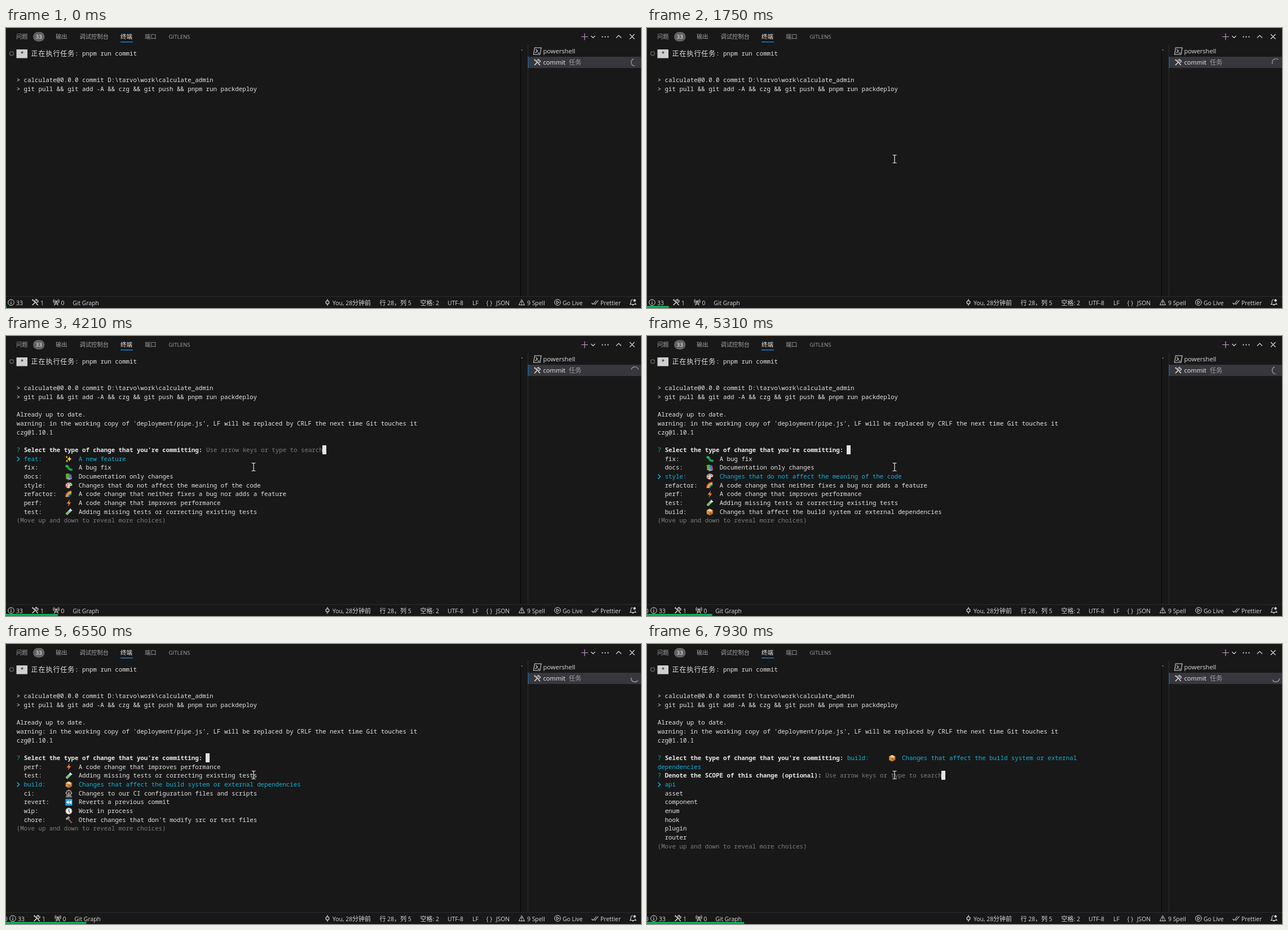
An HTML page with a canvas that plays this animation: 1126 by 497 pixels, repeating every 8000 ms.

```html
<!DOCTYPE html>
<html lang="zh-CN">
<head>
<meta charset="utf-8">
<title>Terminal commit</title>
<style>
  html, body { margin: 0; width: 100%; height: 100%; overflow: hidden; background: #181818; }
  canvas { display: block; width: 1126px; height: 497px; }
</style>
</head>
<body>
<canvas id="stage" width="1126" height="497"></canvas>
<script>
const ctx = document.getElementById('stage').getContext('2d');
const LOOP = 8000;
const MONO = '"Noto Sans Mono", "DejaVu Sans Mono", monospace';
const SANS = '"Open Sans", "Noto Sans", sans-serif';
const CJK = '"Noto Sans CJK SC", "Noto Sans CJK", sans-serif';
const CELL = 6.468, ROW = 15.68, LEFT = 18.7;
const FG = '#e4e4e4', UI = '#d8d8d8', DIM = '#7c7c7c', CYAN = '#14b2da', GREEN = '#0dbc79';

// When each thing happens, in ms
const AT = { mouse: 450, pulled: 2100, warned: 2650, czg: 3000, list: 3150, shift: 4620, scope: 6950 };
const KEYS = [4760, 5040, 5290, 5620, 5910, 6200, 6470];

const TYPES = [
  ['feat', 'A new feature'],
  ['fix', 'A bug fix'],
  ['docs', 'Documentation only changes'],
  ['style', 'Changes that do not affect the meaning of the code'],
  ['refactor', 'A code change that neither fixes a bug nor adds a feature'],
  ['perf', 'A code change that improves performance'],
  ['test', 'Adding missing tests or correcting existing tests'],
  ['build', 'Changes that affect the build system or external dependencies'],
  ['ci', 'Changes to our CI configuration files and scripts'],
  ['revert', 'Reverts a previous commit'],
  ['wip', 'Work in process'],
  ['chore', "Other changes that don't modify src or test files"]
];
const SCOPES = ['api', 'asset', 'component', 'enum', 'hook', 'plugin', 'router'];
const HINT = 'Use arrow keys or type to search';
const MORE = '(Move up and down to reveal more choices)';

function rect(x, y, w, h, color) {
  ctx.fillStyle = color;
  ctx.fillRect(x, y, w, h);
}

function disc(x, y, r, color) {
  ctx.fillStyle = color;
  ctx.beginPath();
  ctx.arc(x, y, r, 0, 7);
  ctx.fill();
}

function line(d, color, width = 1) {
  ctx.strokeStyle = color;
  ctx.lineWidth = width;
  ctx.stroke(new Path2D(d));
}

function shape(d, color) {
  ctx.fillStyle = color;
  ctx.fill(new Path2D(d));
}

function arc(x, y, r, from, to, color, width = 1) {
  ctx.strokeStyle = color;
  ctx.lineWidth = width;
  ctx.beginPath();
  ctx.arc(x, y, r, from, to);
  ctx.stroke();
}

function at(x, y, draw, scale = 1) {
  ctx.save();
  ctx.translate(x, y);
  ctx.scale(scale, scale);
  draw();
  ctx.restore();
}

// Interface text, with Chinese runs set in their own font
function label(str, x, y, color = UI, size = 10.4, cjk = size * 1.06, weight = 400) {
  ctx.fillStyle = color;
  for (const run of str.match(/[\u3000-\uffff]+|[^\u3000-\uffff]+/g)) {
    ctx.font = run.charCodeAt(0) > 0x2fff ? `${weight} ${cjk}px ${CJK}` : `${weight} ${size}px ${SANS}`;
    ctx.fillText(run, x, y);
    x += ctx.measureText(run).width;
  }
}

const colX = col => LEFT + col * CELL;
const midY = row => 45.7 + row * ROW;

function term(str, col, row, color = FG, weight = 500) {
  ctx.font = `${weight} 10.78px ${MONO}`;
  ctx.fillStyle = color;
  ctx.fillText(str, colX(col), Math.round(midY(row) + 3.5));
}

function block(col, row) {
  rect(Math.floor(colX(col) - .5), Math.floor(midY(row) - 8), 7, 16, FG);
}

function pointer(row) {
  at(19.6, midY(row), () => line('M0 -4 L4 0 L0 4', CYAN, 1.5));
}

// Small pictures for commit types, in a box of 14 units around 0,0
const PICS = {
  feat() {
    const star = 'M0 -5 Q.8 -.8 5 0 Q.8 .8 0 5 Q-.8 .8 -5 0 Q-.8 -.8 0 -5Z';
    at(1, 0, () => shape(star, '#ffc83d'));
    at(-4, -3.5, () => shape(star, '#ffb02e'), .5);
    at(-3.5, 4, () => shape(star, '#ffc83d'), .5);
  },
  fix() {
    line('M-4 -3 Q-2 -4 -1 0 Q1 4 5 3.5', '#16a34a', 4);
    disc(-4, -3, 2.5, '#22b455');
    disc(5, 3.5, 2, '#16a34a');
  },
  docs() {
    shape('M-1 -3 L5 -4 L6 4 L0 6Z', '#b4408f');
    shape('M-3 -4 L3 -5 L4 3 L-2 5Z', '#2f80d0');
    shape('M-6 -5 L0 -6 L1 3 L-5 4Z', '#5dac2e');
    line('M-5 4 L1 3 M-2 6 L5 4', '#e8e8e8', 1);
  },
  style() {
    shape('M-6 0 C-6 -7 6 -7 6.5 -1 C6 2 1 0 2 3 C3 7 -6 6 -6 0Z', '#e9c3ad');
    disc(-3, -2.5, 1.3, '#e04545');
    disc(1, -3.7, 1.3, '#3d8be0');
    disc(4, -1.5, 1.2, '#3aa655');
    disc(-3.5, 1.5, 1.3, '#8d55c7');
  },
  refactor() {
    ['#e5484d', '#f59f2f', '#f5d442', '#3fb66b', '#3d8be0'].forEach((c, i) =>
      arc(5, 5, 11 - i * 1.5, Math.PI, Math.PI * 1.5, c, 1.6));
  },
  perf() {
    shape('M2 -7 L-4 1 L0 1 L-2 7 L4 -1.5 L.5 -1.5Z', '#f9803a');
  },
  test() {
    line('M-4.5 4.5 L4 -4', '#b9d7df', 4.5);
    line('M-4.5 4.5 L1 -1', '#6cc644', 3.4);
    line('M2 -6 L6 -2', '#e8eef0', 1.5);
  },
  build() {
    shape('M0 -6 L6 -3 L0 0 L-6 -3Z', '#f3c27a');
    shape('M-6 -3 L0 0 L0 6.5 L-6 3.5Z', '#d98f38');
    shape('M6 -3 L0 0 L0 6.5 L6 3.5Z', '#b86f26');
    line('M-3 -4.5 L3 -1.5 L3 1', '#f7e2b8', 1.3);
  },
  ci() {
    line('M0 0 L-4 6.5 M0 0 L4 6.5 M-6 6.5 H6', '#a9a9a9', 1.2);
    arc(0, -.8, 4.6, 0, 7, '#b99a92', 1.2);
    for (let i = 0; i < 8; i++) {
      const a = i * Math.PI / 4, x = Math.cos(a), y = Math.sin(a);
      line(`M0 -.8 L${x * 4.6} ${y * 4.6 - .8}`, '#9a9a9a', .6);
      disc(x * 5.2, y * 5.2 - .8, 1.1, i % 2 ? '#c88a80' : '#c9c9c9');
    }
  },
  revert() {
    ctx.fillStyle = '#1b9be0';
    ctx.beginPath();
    ctx.roundRect(-6.5, -6.5, 13, 13, 1.5);
    ctx.fill();
    shape('M0 -3.8 L-5 0 L0 3.8Z M5 -3.8 L0 0 L5 3.8Z', '#ffffff');
  },
  wip() {
    disc(0, 0, 6.3, '#b0b0b0');
    disc(0, 0, 5.1, '#f2f2f2');
    line('M0 -4 V0 L2 3', '#333333', 1.1);
  },
  chore() {
    line('M-1 -2 L5.5 5.5', '#a0614a', 2.4);
    line('M-5 -1 L1 -5.5', '#9b9b9b', 4);
  }
};

function typeItem(index, col, row, color, desc = TYPES[index][1]) {
  const name = TYPES[index][0];
  term(name + ':', col, row, color);
  at(111.4 + (col - 2) * CELL, midY(row), PICS[name], .95);
  term(desc, col + 15, row, color);
}

function question(str, row) {
  term('?', 0, row, GREEN);
  term(str, 2, row, '#e8e8e8', 700);
}

function typeList(step) {
  question("Select the type of change that you're committing:", 10);
  if (!step) term(HINT, 52, 10, DIM);
  block(step ? 52 : 84, 10);
  const first = Math.max(0, step - 2);
  for (let i = 0; i < 7; i++) {
    const chosen = first + i === step;
    typeItem(first + i, 2, 11 + i, chosen ? CYAN : FG);
    if (chosen) pointer(11 + i);
  }
  term(MORE, 0, 18, DIM);
}

function scopeList() {
  question("Select the type of change that you're committing:", 10);
  const desc = TYPES[7][1], cut = desc.lastIndexOf(' ');
  typeItem(7, 52, 10, CYAN, desc.slice(0, cut));
  term(desc.slice(cut + 1), 0, 11, CYAN);
  question('Denote the SCOPE of this change (optional):', 12);
  term(HINT, 46, 12, DIM);
  block(78, 12);
  SCOPES.forEach((s, i) => term(s, 2, 13 + i, i ? FG : CYAN));
  pointer(13);
  term(MORE, 0, 20, DIM);
}

function terminal(t) {
  arc(10, 45.3, 3.4, 0, 7, '#6a6a6a', 1.3);
  rect(18.5, 38, 19.5, 15.5, '#d0d0d0');
  term('*', 1, 0, '#181818');
  ctx.font = `12px ${CJK}`;
  ctx.fillStyle = FG;
  [...'正在执行任务'].forEach((c, i) => ctx.fillText(c, colX(4 + 2 * i), 50));
  term(': pnpm run commit', 16, 0);
  term('> calculate@0.0.0 commit D:\\tarvo\\work\\calculate_admin', 0, 3);
  term('> git pull && git add -A && czg && git push && pnpm run packdeploy', 0, 4);
  if (t >= AT.pulled) term('Already up to date.', 0, 6);
  if (t >= AT.warned) term("warning: in the working copy of 'deployment/pipe.js', LF will be replaced by CRLF the next time Git touches it", 0, 7);
  if (t >= AT.czg) term('czg@1.10.1', 0, 8);
  if (t >= AT.scope) scopeList();
  else if (t >= AT.list) typeList(KEYS.filter(k => t >= k).length);
}

function tools(x, y) {
  at(x, y, () => {
    line('M-5 5 L1 -1 M-1 -1 L-4.5 -4.5 M1.5 1.5 L5 5', UI, 1.7);
    line('M5.3 -3.4 A3 3 0 1 1 3 -5.4 L2.3 -2.4 Z', UI, 1.1);
    line('M-5.5 -3.6 L-3.6 -5.5', UI, 1.2);
  });
}

function header() {
  const grey = '#a2a2a2';
  [['问题', 18], ['输出', 88], ['调试控制台', 130.5], ['端口', 246]].forEach(([s, x]) => label(s, x, 19, grey, 10, 10.3));
  label('终端', 203, 19, '#eeeeee', 10, 10.5, 500);
  label('GITLENS', 288.5, 19, grey, 9.7);
  rect(203, 24, 22, 1.5, '#0a84dd');
  ctx.fillStyle = '#616161';
  ctx.beginPath();
  ctx.roundRect(48, 7, 20.5, 17, 8.5);
  ctx.fill();
  label('33', 52.6, 19, '#ffffff', 9.8);
  line('M1020 15.5 H1032 M1026 9.5 V21.5', '#cf93cb', 1.2);
  line('M1037.5 14 L1041 17.5 L1044.5 14 M1082 17.5 L1086.5 13 L1091 17.5 M1106 11 L1114.5 19.5 M1114.5 11 L1106 19.5', UI, 1.2);
  [1057.5, 1062.5, 1067.5].forEach(x => disc(x, 15.7, 1.1, UI));
}

function sidebar(t) {
  rect(912, 37, 1, 439, '#050505');
  rect(913, 38, 3, 2, '#5a5a5a');
  rect(925, 30, 1, 446, '#2b2b2b');
  rect(926, 51, 200, 20, '#37373d');
  rect(925.5, 51, 1, 20, '#0a84dd');
  line('M937.5 35 H949 L947 47 H935.5 Z M939.5 38 L942.5 41 L938.5 44 M942.5 44.5 H946', UI, 1.1);
  label('powershell', 952.5, 45, '#dcdcdc', 11.15);
  tools(942, 61);
  label('commit', 952.5, 65, '#ececec', 11.15);
  label('任务', 998, 65.3, '#a0a0a0', 11.15, 11.2);
  // The spinner turns once in 1.5 s and restarts as git finishes
  const turn = t < 2700 ? 260 + t * .24 : (t - 2710) * .24;
  const mid = (Math.round(turn / 12) * 12 - 90) * Math.PI / 180;
  arc(1115, 61, 6.4, mid - 1.37, mid + 1.37, '#a8a8a8', 1.2);
}

function statusLeft(dx) {
  if (dx) label('0', -3.2, 491.5);
  at(dx, 0, () => {
    arc(9, 487.2, 5.3, 0, 7, UI);
    rect(8.4, 486.5, 1.2, 4, UI);
    rect(8.4, 484, 1.2, 1.3, UI);
    label('33', 18, 491.5);
    tools(51.7, 487);
    label('1', 61, 491.5);
    line('M85.5 492.5 L89 485 L92.5 492.5 M87 490 H91', UI, 1.1);
    disc(89, 485, 1.3, UI);
    for (const r of [3, 5.2]) {
      arc(89, 485, r, -.8, .8, UI);
      arc(89, 485, r, Math.PI - .8, Math.PI + .8, UI);
    }
    label('0', 97.5, 491.5);
    label('Git Graph', 118.3, 491.5);
  });
}

function statusBar(t) {
  rect(0, 476, 1126, 1, '#2b2b2b');
  statusLeft(t >= AT.shift ? 3 : 0);
  arc(570, 487, 2.9, 0, 7, UI, 1.2);
  line('M570 481 V484 M570 490 V493', UI, 1.2);
  [['You, 28分钟前', 579], ['行 28，列 5', 662.5], ['空格: 2', 734.5], ['UTF-8', 783], ['LF', 827],
   ['{ }', 851.5], ['JSON', 868.8], ['9 Spell', 924], ['Go Live', 987], ['Prettier', 1054]]
    .forEach(([s, x]) => label(s, x, 491.5));
  line('M914.5 482 L919.5 491.5 H909.5 Z M914.5 485 V488.5 M914.5 489.3 V490.5', UI);
  arc(978, 487, 5.3, 0, 7, UI);
  line('M976.3 484.2 L981 487 L976.3 489.8 Z', UI);
  line('M1038.5 488 L1041 490.5 L1047 483.5 M1043.5 489.5 L1044.5 490.5 L1050.5 483.5', UI, 1.1);
  line('M1111 482 Q1108 482.5 1108 486 V488.5 L1106.5 490.5 H1117 L1115.5 488.5 V487.5 M1110.5 491 Q1111.7 493.3 1113 491', UI, 1.1);
  disc(1114.5, 483.5, 2.2, UI);
  rect(0, 493.5, .9 + t * .0216, 3, '#10c45e');
}

function mouse(t) {
  if (t < AT.mouse) return;
  const p = Math.min(1, Math.max(0, (t - 1000) / 400));
  at(431 + Math.round(8 * p * p * (3 - 2 * p)), 232.5, () =>
    line('M-3.5 -7 H-1 L0 -6 L1 -7 H3.5 M0 -6 V6 M-3.5 7 H-1 L0 6 L1 7 H3.5', '#e8e8e8', 1.2));
}

function frame(now) {
  const t = now % LOOP;
  rect(0, 0, 1126, 497, '#181818');
  header();
  terminal(t);
  sidebar(t);
  statusBar(t);
  mouse(t);
}

const start = performance.now();
function tick() {
  frame(performance.now() - start);
  requestAnimationFrame(tick);
}
tick();
</script>
</body>
</html>
```
